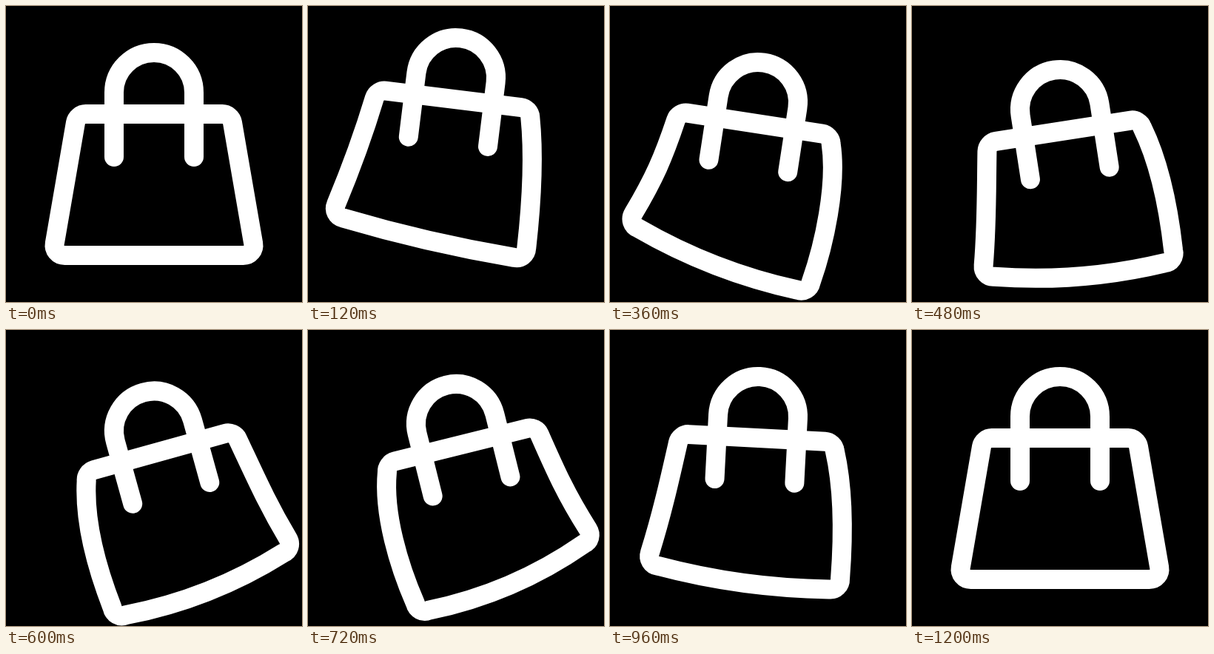
Recreate the animation shown at these times as an HTML page. Size 400 by 400 pixels, loop 2230 ms.

```html
<!DOCTYPE html>
<html lang="en">
<head>
<meta charset="utf-8">
<title>Swinging bag</title>
<style>
  html, body { margin: 0; width: 100%; height: 100%; overflow: hidden; background: #000; }
  svg { display: block; width: 100vw; height: 100vh; }
  path { fill: none; stroke: #fff; stroke-width: 26; stroke-linecap: round; stroke-linejoin: round; }
</style>
</head>
<body>
<svg viewBox="0 0 400 400">
  <g id="bag">
    <path d="M-54 87V0A54 54 0 0 1 54 0V87"/>
    <path id="body"/>
  </g>
</svg>
<script>
const LOOP = 2230, STEP = 30, KEY = 120;

// One value every KEY ms
const lift  = [0, -20, -20, 13, 23, 19.5, 10, 2.7, 0, 0, 0];
const tilt  = [0, 7, 14, 8.7, -8.8, -15.5, -14, -5, 3, 2, 0];
const bend  = [0, 6, 11.5, 12.5, 4.2, -6, -9.2, -3, 4.8, 5, 0];
const bulge = [0, 2, 4.3, 5, 5, 6, 6.5, 5, 4, 2.5, 0];

const bag = document.getElementById('bag');
const body = document.getElementById('body');

// Smooth curve through the keys, at rest on both ends
function sample(keys, time) {
  const last = keys.length - 1;
  const pos = Math.min(time / KEY, last);
  const i = Math.min(Math.floor(pos), last - 1);
  const u = pos - i;
  const slope = k => k === 0 || k === last ? 0 : (keys[k + 1] - keys[k - 1]) / 2;
  const a = keys[i], b = keys[i + 1], m = slope(i), n = slope(i + 1);
  return a + u * (m + u * (3 * (b - a) - 2 * m - n + u * (2 * (a - b) + m + n)));
}

function bodyPath(bendDeg, swell) {
  const angle = bendDeg * Math.PI / 180;
  const cos = Math.cos(angle), sin = Math.sin(angle);
  const top = (x, y) => [x, y];
  // The lower edge turns, shifts and rises a little with the bend
  const foot = (x, y) => {
    x *= 1 - swell / 121;
    y -= 207;
    return [x * cos - y * sin - 1.5 * bendDeg, 207 - 0.4 * swell + x * sin + y * cos];
  };
  const mix = (p, q) => p.map((v, i) => v + (q[i] - v) * 0.55);
  const curve = (...points) => 'C' + points.map(p => p.map(v => v.toFixed(2))).join(' ');
  const corner = (from, tip, to) => curve(mix(from, tip), mix(to, tip), to);
  const low = 220 + 2.4 * swell;
  // The side on the outside of the bend swells most
  const share = Math.min(1, Math.max(0, 0.5 + bendDeg / 8));
  const right = 1.5 * swell * share;
  const left = 1.5 * swell * (1 - share);

  return 'M-92.3 29H92.3'
    + corner(top(92.3, 29), top(104, 29), top(106, 40.5))
    + curve(top(115.3 + right, 94.5), foot(124.9 + right, 150), foot(134.2, 203.7))
    + corner(foot(134.2, 203.7), foot(137, 220), foot(120.5, 220))
    + curve(foot(40, low), foot(-40, low), foot(-120.5, 220))
    + corner(foot(-120.5, 220), foot(-137, 220), foot(-134.2, 203.7))
    + curve(foot(-124.9 - left, 150), top(-115.3 - left, 94.5), top(-106, 40.5))
    + corner(top(-106, 40.5), top(-104, 29), top(-92.3, 29))
    + 'Z';
}

function draw(time) {
  const t = Math.floor((time % LOOP) / STEP) * STEP;
  bag.setAttribute('transform', `translate(200 ${117 + sample(lift, t)}) rotate(${sample(tilt, t)})`);
  body.setAttribute('d', bodyPath(sample(bend, t), sample(bulge, t)));
}

let start;
function tick(now) {
  start ??= now;
  draw(now - start);
  requestAnimationFrame(tick);
}
draw(0);
requestAnimationFrame(tick);
</script>
</body>
</html>
```
